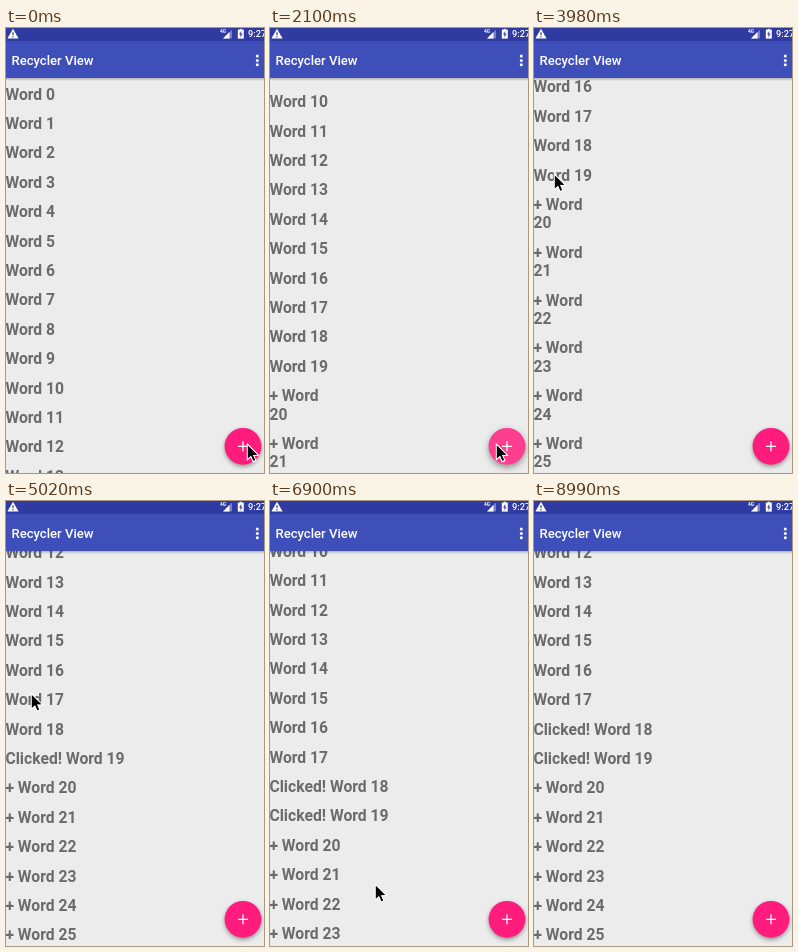
An HTML page with a canvas for the animation above (9.41 s loop, 258x445 px).

```html
<!DOCTYPE html>
<html lang="en">
<head>
<meta charset="utf-8">
<title>Recycler View</title>
<style>
  html, body { margin: 0; width: 100%; height: 100%; overflow: hidden; background: #ececec; }
  canvas { display: block; }
</style>
</head>
<body>
<canvas id="stage" width="258" height="445"></canvas>
<script>
const ctx = document.getElementById('stage').getContext('2d');
const LOOP = 9410, TICKS = 45, SHORT = [11, 19, 34, 41];
const LINE = 18.4, ROW = 29.4, FIRST = 66, LAST = 433.8, TEXT = 15.7;

// Pointer path: tick, x, y (linear between entries, held where repeated).
const path = [
  [0, 241, 416], [3, 241, 416], [4, 204, 402], [5, 197, 398], [7, 221, 416],
  [8, 226, 416], [14, 226, 416], [15, 237, 418], [19, 20, 146], [23, 20, 146],
  [25, 30, 239], [26, 33, 225], [28, 33, 225], [29, 91, 330], [30, 91, 330],
  [33, 112, 410], [36, 91, 330], [37, 93, 334], [42, 211, 443], [43, 300, 500]
];
// Number of words from each tick on.
const counts = [[0, 20], [3, 21], [10, 22], [11, 24], [12, 25], [15, 26]];

// The picture advances in ticks of 210 ms, a few of them 200 ms.
function tickAt(ms) {
  let tick = 0;
  for (let end = 0; tick < TICKS; tick++) {
    end += SHORT.includes(tick) ? 200 : 210;
    if (ms < end) break;
  }
  return tick;
}

function pointerAt(tick) {
  const i = path.findIndex(p => p[0] > tick);
  if (i < 0) return path[path.length - 1].slice(1);
  const [t0, x0, y0] = path[i - 1], [t1, x1, y1] = path[i];
  const k = (tick - t0) / (t1 - t0);
  return [x0 + (x1 - x0) * k, y0 + (y1 - y0) * k];
}

function poly(color, ...pts) {
  ctx.beginPath();
  pts.forEach(([x, y]) => ctx.lineTo(x, y));
  ctx.closePath();
  ctx.fillStyle = color;
  ctx.fill();
}

function rect(color, x, y, w, h) {
  ctx.fillStyle = color;
  ctx.fillRect(x, y, w, h);
}

function disc(color, x, y, r) {
  ctx.beginPath();
  ctx.arc(x, y, r, 0, 7);
  ctx.fillStyle = color;
  ctx.fill();
}

function label(text, x, y, size, weight, color) {
  ctx.font = `${weight} ${size}px Roboto, sans-serif`;
  ctx.fillStyle = color;
  ctx.fillText(text, x, y);
}

function drawList(tick, pointerY) {
  const count = counts.filter(c => c[0] <= tick).pop()[1];
  const wide = tick >= 20;
  const lines = [];
  let y = FIRST;
  for (let i = 0; i < count; i++) {
    const clicked = (i === 19 && wide) || (i === 18 && tick >= 27);
    const added = i >= 20;
    if (added && !wide) {
      lines.push(['+ Word', y]);
      y += LINE;
      lines.push([String(i), y]);
    } else {
      lines.push([(clicked ? 'Clicked! ' : added ? '+ ' : '') + 'Word ' + i, y]);
    }
    y += ROW;
  }
  let lift = 0;
  if (tick === 3) lift = 114;
  if (tick === 15) lift = 20;
  if (tick >= 31 && tick <= 36) lift = pointerY - 326;
  const shift = tick < 3 ? 0 : LAST + lift - (y - ROW);
  for (const [text, at] of lines) {
    const mid = at + shift;
    if (mid > 35 && mid < 460) label(text, -0.6, mid + 5.6, TEXT, 700, '#6b6b6b');
  }
}

function drawBars() {
  const shade = ctx.createLinearGradient(0, 50, 0, 53);
  shade.addColorStop(0, 'rgba(0,0,0,.25)');
  shade.addColorStop(1, 'rgba(0,0,0,0)');
  rect(shade, 0, 50, 258, 3);
  rect('#3f4fba', 0, 13, 258, 37);
  rect('#2f3ba0', 0, 0, 258, 13);
  label('Recycler View', 5.5, 37.2, 13.1, 500, '#fff');
  for (const y of [28, 32.4, 36.8]) disc('#fff', 251.3, y, 1.5);

  poly('#fff', [7, 0.8], [12.6, 10.6], [1.4, 10.6]);
  rect('#2f3ba0', 6.4, 4.2, 1.2, 3);
  rect('#2f3ba0', 6.4, 8.2, 1.2, 1.2);

  label('4G', 214, 5.2, 4.8, 700, '#fff');
  poly('rgba(255,255,255,.35)', [226, 1.5], [226, 10.5], [217, 10.5]);
  poly('#fff', [223.5, 4], [223.5, 10.5], [217, 10.5]);
  rect('#fff', 231.8, 1.6, 6, 9);
  rect('#fff', 233.6, 0.8, 2.4, 1);
  poly('#2f3ba0', [235.4, 3], [233, 6.6], [234.5, 6.6], [234.2, 9.4], [236.6, 5.7], [235.1, 5.7]);
  label('9:27', 242, 9.4, 9.2, 500, '#fff');
}

function drawButton(pressed) {
  ctx.save();
  ctx.shadowColor = 'rgba(0,0,0,.38)';
  ctx.shadowBlur = pressed ? 6 : 4;
  ctx.shadowOffsetY = pressed ? 3 : 2;
  disc('#ff1c7c', 237, 418.3, 18.4);
  ctx.restore();
  if (pressed) disc('rgba(255,255,255,.15)', 237, 418.3, 18.4);
  rect('#fff', 232, 417.7, 10, 1.3);
  rect('#fff', 236.35, 413.3, 1.3, 10);
}

function drawPointer(x, y) {
  ctx.save();
  ctx.translate(x + 0.5, y + 0.5);
  ctx.lineWidth = 1.4;
  ctx.strokeStyle = '#fff';
  poly('#000', [0, 0], [0, 14.8], [3.4, 11.7], [5.7, 17], [8.2, 16], [5.9, 10.8], [10.6, 10.6]);
  ctx.stroke();
  poly('#000', [0.3, 1], [0.3, 14], [3.6, 11], [5.9, 16.3], [7.6, 15.6], [5.3, 10.3], [9.8, 10.2]);
  ctx.restore();
}

function draw(now) {
  const tick = tickAt(now % LOOP);
  const [x, y] = pointerAt(tick);
  rect('#ececec', 0, 0, 258, 445);
  drawList(tick, y);
  drawBars();
  drawButton(tick === 10 || tick === 11);
  drawPointer(x, y);
}

const start = performance.now();
function loop() {
  draw(performance.now() - start);
  requestAnimationFrame(loop);
}
loop();
</script>
</body>
</html>
```
